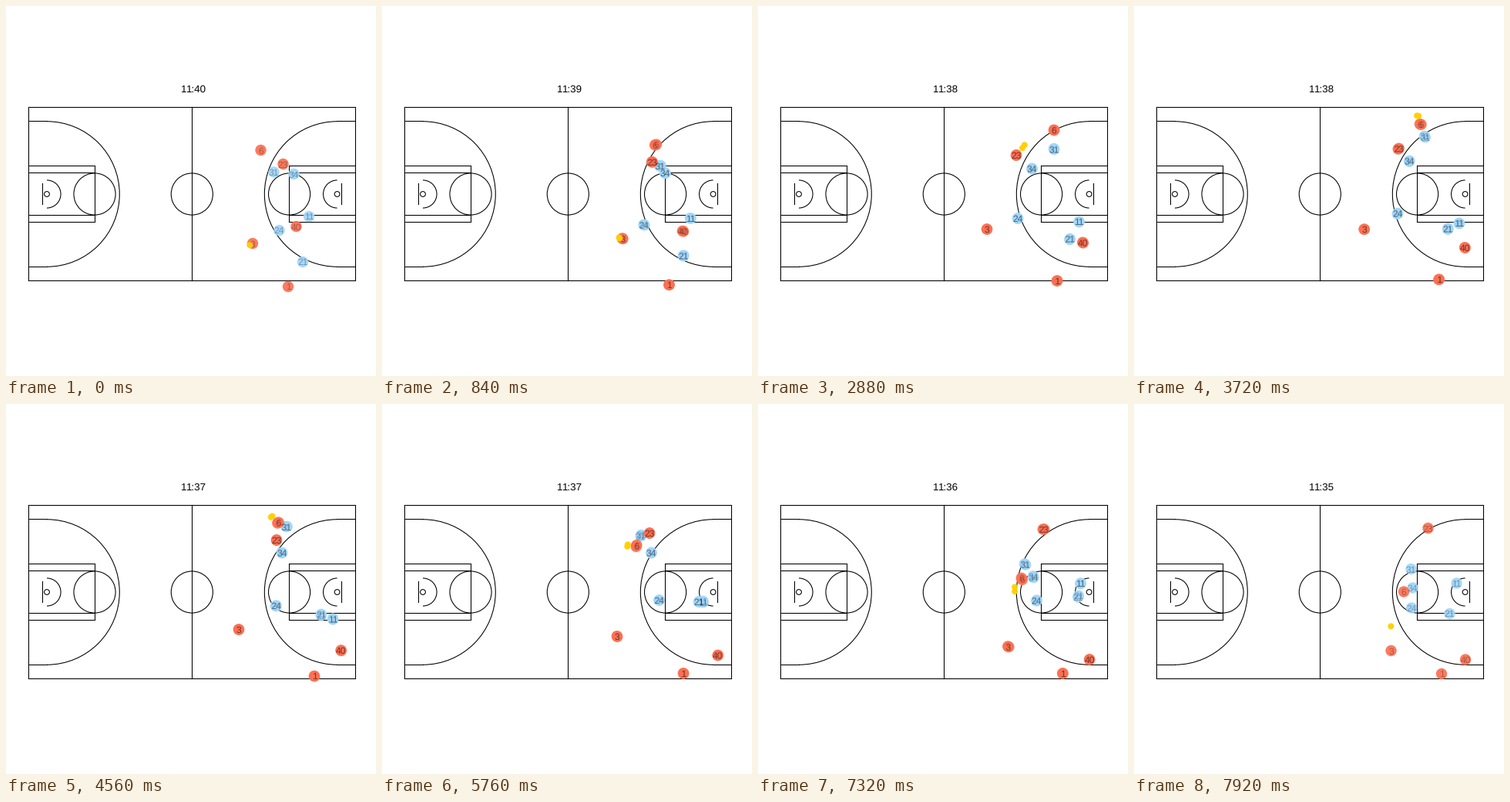
A matplotlib script that plays this animation: 480 by 480 pixels, repeating every 8 s.

```python
import numpy as np
import matplotlib.pyplot as plt
from matplotlib.animation import FuncAnimation
from matplotlib.patches import Arc, Circle

plt.rcParams.update({"font.family": "Liberation Sans", "text.hinting": "none"})
SIZE, DPI = 480, 100
PX = 72 / DPI                      # points per pixel
TICKS, HOLD, INTERVAL = 200, 3, 40
TOMATO, SKY, GOLD = "#fc7052", "#a0d6fb", "#ffd000"
FOOT = 4.51                        # pixels per foot
MID_X, MID_Y = 241.3, 244.0


class Run:
    """Smooth run through a few (step, x, y) key points."""

    def __init__(self, *keys):
        keys = np.array(keys, float)
        self.t, self.p = keys[:, 0], keys[:, 1:]
        self.m = np.gradient(self.p, self.t, axis=0)

    def __call__(self, t):
        t = np.clip(t, self.t[0], self.t[-1])
        k = min(np.searchsorted(self.t, t, "right") - 1, len(self.t) - 2)
        h = self.t[k + 1] - self.t[k]
        u = (t - self.t[k]) / h
        p, m = self.p, self.m
        return ((1 + 2 * u) * (1 - u) ** 2 * p[k] + u * (1 - u) ** 2 * h * m[k]
                + u * u * (3 - 2 * u) * p[k + 1] + u * u * (u - 1) * h * m[k + 1])


# One step lasts 120 ms.
BLUE = {
    "31": Run((0, 347.5, 215.5), (24, 384, 185.5), (38, 364, 159),
              (48, 336, 170.5), (61, 346.5, 208), (66, 359.5, 214)),
    "34": Run((0, 373.5, 218), (24, 355.5, 211), (38, 358, 193),
              (48, 349.5, 193), (66, 361.5, 238.5)),
    "11": Run((0, 393, 273), (24, 416.5, 280), (38, 424, 279),
              (48, 416.5, 256.5), (61, 418.5, 232.5)),
    "24": Run((0, 354.5, 291), (7, 340, 284), (24, 337, 275.5),
              (48, 359.5, 254.5), (61, 361.5, 255), (66, 360, 264.5)),
    "21": Run((0, 385, 332), (24, 404.5, 302.5), (48, 411, 256.5),
              (61, 415.5, 249.5), (66, 409.5, 272)),
}
RED = {
    "23": Run((0, 359.5, 205), (24, 335, 193.5), (38, 351, 176.5),
              (48, 347, 167.5), (66, 381.5, 161)),
    "40": Run((0, 376.5, 286), (24, 421.5, 307), (41, 436, 322), (61, 430, 331.5)),
    "3": Run((0, 320, 308), (24, 297, 289.5), (38, 302, 292.5),
             (48, 305, 301.5), (66, 333.5, 320)),
    "1": Run((0, 366, 364), (24, 388, 356.5), (38, 400, 353),
             (50, 390, 349), (66, 399, 350)),
    "6": Run((0, 330.5, 187), (7, 355, 180), (24, 384, 161),
             (38, 353, 154), (48, 330, 184), (66, 350, 243.5)),
}

# Who has the ball: player, from, until, reach, angle, turn per step.
HOLDS = (
    ("3", 0, 10, 4.3, 150, 6),
    ("23", 19, 22.5, 4, -45, 0),
    ("6", 30, 60.2, 11.5, 256, -4.1),
    ("3", 69.3, 80, 0, 0, 0),
)


def in_hand(hold, t):
    player, start, _, reach, angle, turn = hold
    a = np.radians(angle + turn * (t - start))
    return RED[player](t) + reach * np.array([np.cos(a), np.sin(a)])


def ball(t):
    """Carried beside its holder, or on a straight pass to the next one."""
    for now, then in zip(HOLDS, HOLDS[1:]):
        leave, arrive = now[2], then[1]
        if t <= leave:
            return in_hand(now, t)
        if t < arrive:
            u = (t - leave) / (arrive - leave)
            return (1 - u) * in_hand(now, leave) + u * in_hand(then, arrive)
    return in_hand(HOLDS[-1], t)


fig = plt.figure(figsize=(SIZE / DPI, SIZE / DPI), dpi=DPI, facecolor="white")
ax = fig.add_axes([0, 0, 1, 1])
ax.set(xlim=(0, SIZE), ylim=(SIZE, 0))
ax.axis("off")
INK = dict(color="black", lw=1.07 * PX, zorder=1)


def line(x, y):
    """Straight line on whole pixels."""
    ax.plot(np.floor(x), np.floor(y), solid_capstyle="projecting", **INK)


def arc(x, r, a0=0, a1=360):
    ax.add_patch(Arc((x, MID_Y), 2 * r, 2 * r, theta1=a0, theta2=a1, **INK))


def half_court(side):
    """side is -1 for the left half, 1 for the right half."""
    def sx(feet):
        return MID_X + side * feet * FOOT

    a0, a1 = (-90, 90) if side < 0 else (90, 270)
    end, foul, hoop = sx(47), sx(28), sx(41.75)
    three = 20.9 * FOOT
    for s in (-1, 1):
        for half, x in ((25, MID_X), (8, foul), (6, foul), (20.9, hoop)):
            y = MID_Y + s * half * FOOT
            line([end, x], [y, y])
    for x, half in ((end, 25), (foul, 8), (sx(43), 3)):
        line([x, x], [MID_Y - half * FOOT, MID_Y + half * FOOT])
    arc(foul, 6 * FOOT)
    arc(hoop, 0.75 * FOOT)
    arc(hoop, 4 * FOOT, a0, a1)
    arc(hoop, three, a0, a1)


half_court(-1)
half_court(1)
line([MID_X, MID_X], [MID_Y - 25 * FOOT, MID_Y + 25 * FOOT])
arc(MID_X, 6 * FOOT)

# The clock is split after its first digit so that "11" is not kerned.
CLOCK = dict(va="baseline", fontsize=13.33 * PX)
ax.text(234.2, 112, "1", ha="right", **CLOCK)
clock = ax.text(234.2, 112, "", ha="left", **CLOCK)


class Token:
    """A disc drawn once or twice per step, with an optional number."""

    def __init__(self, path, color, r, z, alpha, label=""):
        self.path = path
        self.discs = [ax.add_patch(Circle((0, 0), r, fc=color, ec="none",
                                          alpha=alpha, zorder=z)) for _ in range(2)]
        self.texts = [ax.text(0, 0, label, ha="center", va="baseline", alpha=0.31,
                              fontsize=12 * PX, zorder=5) for _ in range(2)]

    def show(self, times):
        for k, (disc, text) in enumerate(zip(self.discs, self.texts)):
            on = k < len(times)
            disc.set_visible(on)
            text.set_visible(on)
            if on:
                x, y = self.path(times[k])
                disc.center = (x, y)
                text.set_position((x, y + 4.4))


def team(players, color, z):
    return [Token(run, color, 7.2, z, 0.92, num) for num, run in players.items()]


tokens = team(BLUE, SKY, 3) + team(RED, TOMATO, 4)
tokens.append(Token(ball, GOLD, 4, 6, 0.97))


def update(i):
    n = i // HOLD
    # Most steps hold two tracking samples, every eleventh only one.
    times = (n - 0.3, n + 0.3) if n % 11 else (n,)
    clock.set_text(f"1:{40 - (n + 10) // 15}")
    for token in tokens:
        token.show(times)
    return []


anim = FuncAnimation(fig, update, frames=TICKS, interval=INTERVAL,
                     init_func=lambda: update(0), repeat=True, repeat_delay=0)
plt.show()
```
